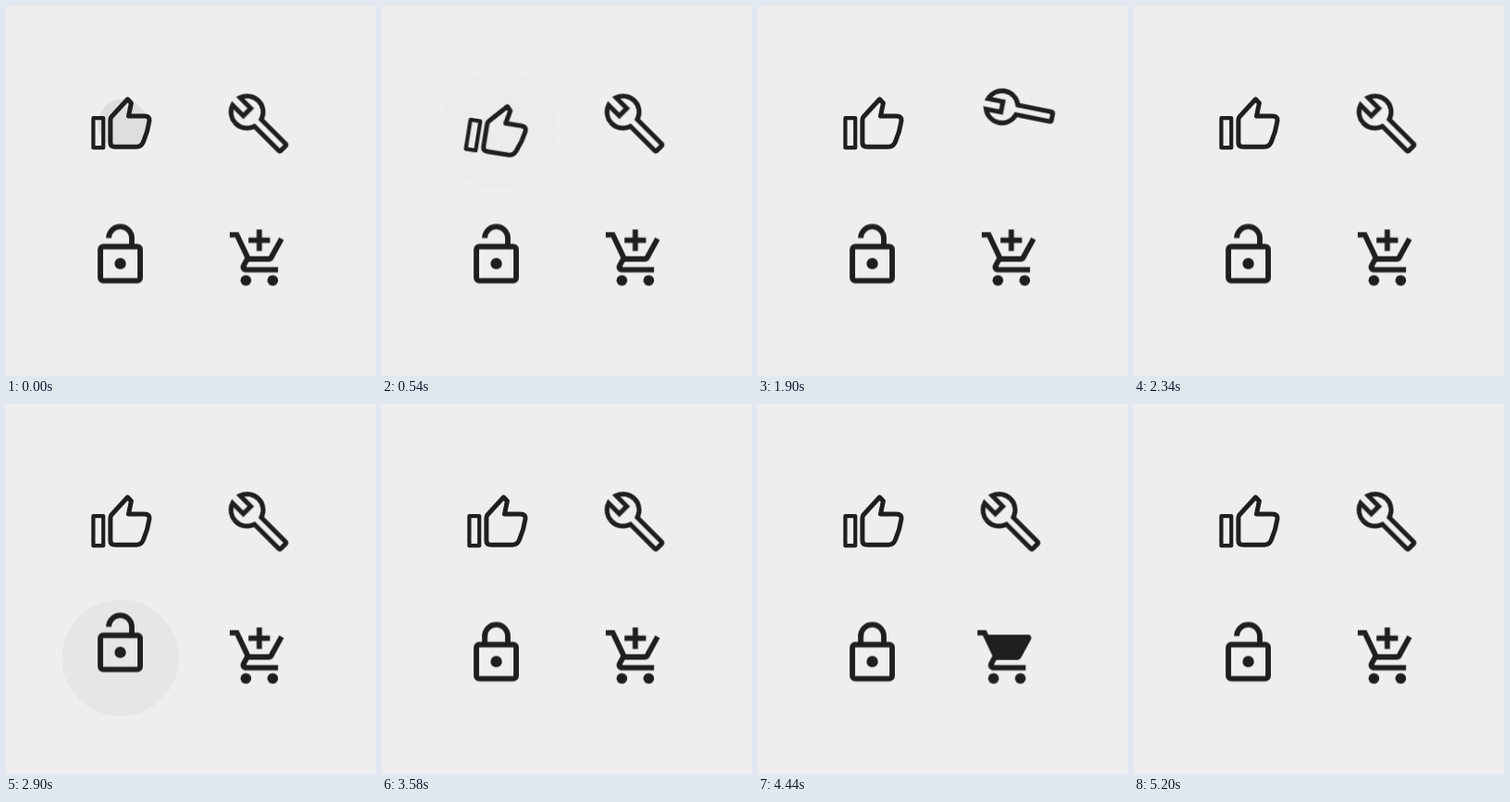
An HTML page that plays this animation: 400 by 400 pixels, repeating every 5780 ms.

```html
<!DOCTYPE html>
<html lang="en">
<head>
<meta charset="utf-8">
<title>Icon taps</title>
<style>
  html, body { margin: 0; width: 100%; height: 100%; overflow: hidden; background: #eee; }
  svg { display: block; width: 100%; height: 100%; fill: #1f1f1f; }
  .line { fill: none; stroke: #1f1f1f; }

  /* Every part loops together; --at is the moment its icon is tapped. */
  .tap { --at: 0ms; --lift: 0px; }
  #thumb { --lift: -6px; }
  #wrench { --at: 1200ms; }
  #lock { --at: 2580ms; }
  #cart { --at: 3720ms; }
  .tap * {
    animation: 5780ms ease-in-out infinite;
    animation-delay: calc(var(--at) - 5780ms);
  }

  .ripple { fill: #000; transform-box: fill-box; transform-origin: center; animation-name: grow, fade; }
  .hand { transform-origin: 124px 127px; animation-name: like; }
  .tool { transform-origin: 252.8px 106.7px; animation-name: turn; }
  .padlock { transform-origin: 123.5px 268px; animation-name: slam; }
  .leg { stroke-dasharray: 3.4; animation-name: latch; }
  .trolley { animation-name: roll; }
  .plus { animation-name: drop, vanish; }
  .load { animation-name: load; }

  @keyframes grow {
    0% { transform: translateY(var(--lift)) scale(.41); animation-timing-function: cubic-bezier(0, 0, .2, 1); }
    6.9%, 100% { transform: none; }
  }
  @keyframes fade {
    0% { opacity: .07; animation-timing-function: linear; }
    10.2%, 100% { opacity: 0; }
  }
  @keyframes like {
    0%, 4.3%, 18.7%, 100% { transform: none; }
    10.7% { transform: translateY(7px) rotate(10deg); }
    14.4% { transform: translateY(-12px) rotate(-14deg) scale(1.1); }
  }
  @keyframes turn {
    0%, 5.2%, 19.7%, 100% { transform: none; }
    11.8% { transform: rotate(-34deg); }
    16.6% { transform: rotate(8deg); }
  }
  @keyframes slam {
    0%, 1.7%, 17.3%, 100% { transform: none; }
    5.2%, 10.4% { transform: translateY(-10px); }
    12.8% { transform: translateY(9px) rotate(12deg); }
    14.9% { transform: translateY(3px) rotate(-6deg); }
  }
  @keyframes latch {
    0%, 10.7% { stroke-dashoffset: 3.4; opacity: 1; }
    12.8%, 40.1% { stroke-dashoffset: 0; opacity: 1; }
    45.3%, 100% { stroke-dashoffset: 0; opacity: 0; }
  }
  @keyframes roll {
    0%, 10.5%, 19.7%, 100% { transform: none; }
    15.6% { transform: translateX(-15px); }
  }
  @keyframes drop {
    0%, 4.3% { transform: none; animation-timing-function: ease-in; }
    9%, 20% { transform: translateY(3px); animation-timing-function: step-start; }
    20.1%, 100% { transform: none; }
  }
  @keyframes vanish {
    0%, 8.5% { opacity: 1; }
    9.7%, 20.4% { opacity: 0; }
    25.6%, 100% { opacity: 1; }
  }
  @keyframes load {
    0%, 7.6% { opacity: 0; }
    9.7%, 20.4% { opacity: 1; }
    25.6%, 100% { opacity: 0; }
  }
</style>
</head>
<body>
<svg viewBox="0 0 400 400">
  <g class="tap" id="thumb">
    <circle class="ripple" cx="126" cy="133.5" r="64"/>
    <g class="hand" stroke-linejoin="round">
      <rect class="line" x="94.4" y="121.2" width="10.8" height="32" stroke-width="4.2"/>
      <path class="line" stroke-width="5"
        d="M112.9 123Q112.9 121 114.3 119.5L131.5 100.8L135.4 105L132.5 119H149.5Q156 119 154.8 125Q153.2 136 148.6 146.5Q146.2 152.3 141 152.3H118Q112.9 152.3 112.9 147.5Z"/>
    </g>
  </g>

  <g class="tap" id="wrench">
    <circle class="ripple" cx="273.5" cy="124" r="64"/>
    <g class="tool">
      <path class="line" transform="translate(260.6 114.7) rotate(45)" stroke-width="5.1"
        d="M53.3 -5.3H16.5A17.3 17.3 0 0 0 -16.3 -5.8H0V5.8H-16.3A17.3 17.3 0 0 0 16.5 5.3H53.3Q55.3 5.3 55.3 3.3V-3.3Q55.3 -5.3 53.3 -5.3Z"/>
    </g>
  </g>

  <g class="tap" id="lock">
    <circle class="ripple" cx="123.5" cy="274.5" r="64"/>
    <g class="padlock">
      <g transform="translate(86.7 232.5) scale(3.07)" stroke-width="1.9">
        <rect class="line" x="5" y="9" width="14" height="12" rx="1"/>
        <path class="line" d="M7.95 6a4.05 4.05 0 0 1 8.1 0V8.6"/>
        <path class="line leg" d="M7.95 5.5V8.6"/>
        <circle cx="12" cy="15" r="2"/>
      </g>
    </g>
  </g>

  <g class="tap" id="cart">
    <circle class="ripple" cx="271" cy="271" r="64"/>
    <g class="trolley">
      <g transform="translate(239 238.7) scale(2.9)">
        <path d="M7.17 14.75l.03-.12.9-1.63h7.45c.75 0 1.41-.41 1.75-1.03l3.86-7.01L19.42 4l-1.11 2-2.76 5H8.53L6.16 6 4.27 2H1v2h2l3.6 7.59-1.35 2.45C5.09 14.32 5 14.65 5 15c0 1.1.9 2 2 2h12v-2H7.42c-.13 0-.25-.11-.25-.25z"/>
        <circle cx="7" cy="20" r="2"/>
        <circle cx="17" cy="20" r="2"/>
        <path class="load" d="M5 3.7H20a1 1 0 0 1 .88 1.5L17.3 11.97Q16.8 13 15.55 13H8L6 9Z"/>
        <path class="plus" d="M11 9h2V6h3V4h-3V1h-2v3H8v2h3z"/>
      </g>
    </g>
  </g>
</svg>
</body>
</html>
```
